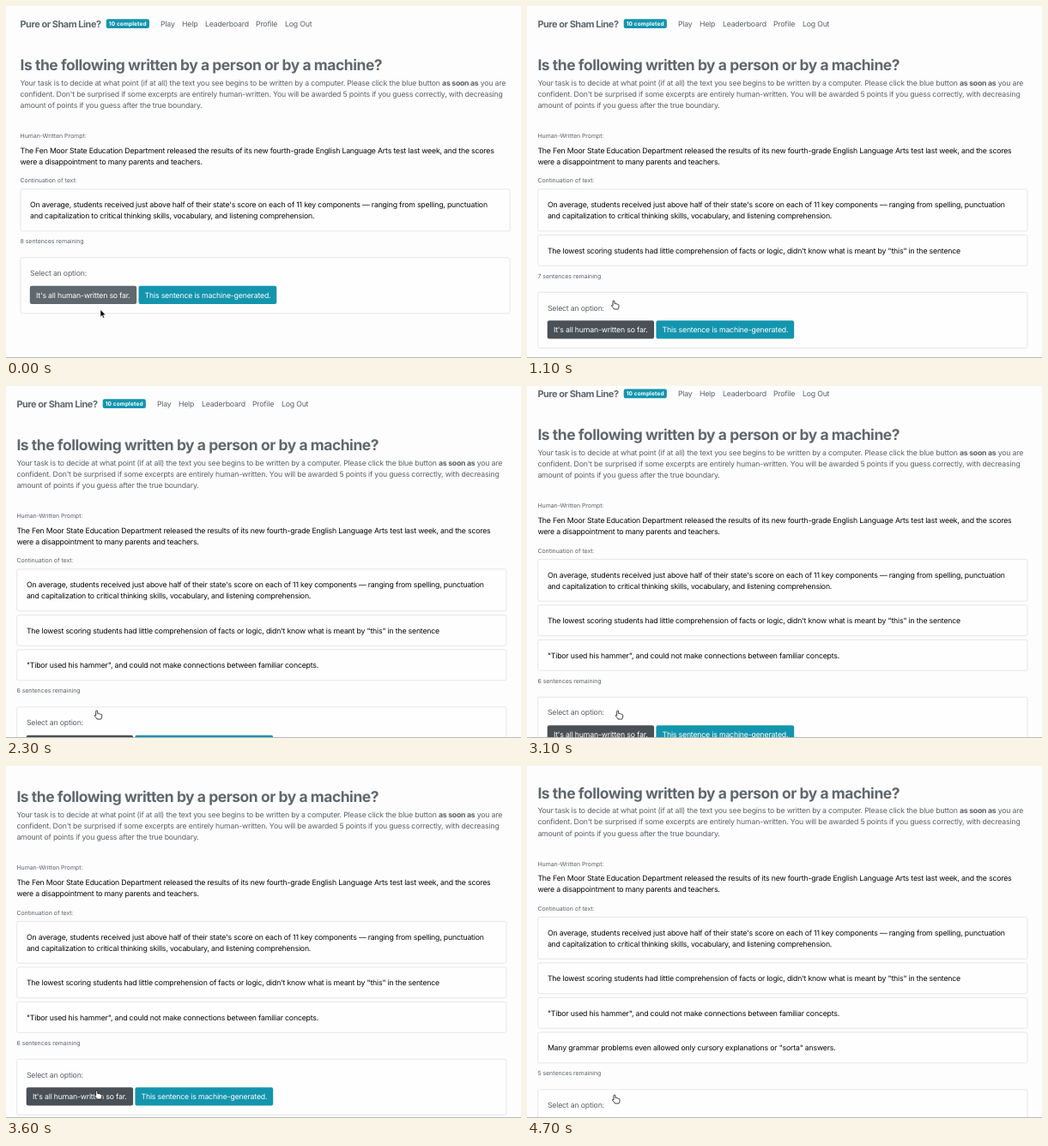
These frames come from a looping animation (600x411 px, 5000 ms). An HTML page:

```html
<!DOCTYPE html>
<html lang="en">
<head>
<meta charset="utf-8">
<title>Written by a person or by a machine?</title>
<style>
  html, body { margin: 0; height: 100%; overflow: hidden; background: #fdfdfd; }
  svg { display: block; width: 100vw; height: 100vh; }
  text { font: 8.72px Inter, "Open Sans", sans-serif; letter-spacing: -.0205em; fill: #080808; text-rendering: geometricPrecision; white-space: pre; }
  .grey { fill: #59616a; }
  .small { font-size: 6.98px; letter-spacing: -.004em; fill: #59616a; }
  .title { font-size: 17.45px; font-weight: 700; letter-spacing: -.026em; fill: #60676e; }
  .brand { font-size: 10.9px; font-weight: 700; letter-spacing: -.04em; fill: #60676e; }
  .badge { font-size: 6.54px; font-weight: 700; letter-spacing: .016em; fill: #fff; }
  .label { fill: #fff; }
  .bold { font-weight: 700; letter-spacing: -.03em; }
  .card { fill: #fefefe; stroke: #dcdddf; stroke-width: .7; }
  .teal { fill: #1495ae; }
</style>
</head>
<body>
<svg viewBox="0 0 600 411">
  <g id="page"></g>
  <rect y="410" width="600" height="1" fill="#b9b9b9"/>
  <path id="arrow" d="M0 0V8.6L2 6.8 3.3 9.8 4.7 9.2 3.4 6.3H6.1Z" fill="#000" stroke="#fff" stroke-width=".6"/>
  <path id="hand" d="M-1 1a1 1 0 0 1 2 0v2.4q1.6-.5 1.8.5 1.5-.4 1.7.5 1.5-.2 1.5 1V7q0 1.5-1 3h-4.6q-.5-1.2-2.5-3.3-.9-1.3.2-1.6.5 0 .9.8z" fill="#fff" stroke="#111" stroke-width=".8" stroke-linejoin="round"/>
</svg>
<script>
const LOOP = 5000, STEP = 100;
const ROW = 40.5;                       // height one more sentence adds
const ADD_TIMES = [1000, 2200, 4300];   // clicks that reveal a sentence
const CURSOR = [
  [0, 110, 354.5], [600, 101, 344], [1200, 101, 344], [1600, 105.7, 378.2],
  [1800, 105.7, 378.2], [1900, 105.7, 379], [4300, 105.7, 379], [4700, 102, 384]
];
const $ = id => document.getElementById(id);
const text = (x, y, str, cls = "") => `<text x="${x}" y="${y}" class="${cls}">${str}</text>`;
const rect = (x, y, w, h, attrs) => `<rect x="${x}" y="${y}" width="${w}" height="${h}" rx="2.2" ${attrs}/>`;
const card = (y, h) => rect(16.8, y, 570.3, h, 'class="card"');

const nav = [[180, "Play"], [205, "Help"], [232, "Leaderboard"], [291, "Profile"], [325, "Log Out"]];
const sentences = [
  "The lowest scoring students had little comprehension of facts or logic, didn't know what is meant by \"this\" in the sentence",
  "\"Tibor used his hammer\", and could not make connections between familiar concepts.",
  "Many grammar problems even allowed only cursory explanations or \"sorta\" answers."
];

$("page").innerHTML =
  text(16.5, 24.5, "Pure or Sham Line?", "brand") +
  rect(116.8, 15.2, 50.2, 10.7, 'class="teal"') + text(119.8, 22.9, "10 completed", "badge") +
  nav.map(([x, word]) => text(x, 23.8, word, "grey")).join("") +
  text(16.5, 75, "Is the following written by a person or by a machine?", "title") +
  text(16.5, 92.8, 'Your task is to decide at what point (if at all) the text you see begins to be written by a computer. Please click the blue button <tspan class="bold">as soon as</tspan> you are', "grey") +
  text(16.5, 105.9, "confident. Don't be surprised if some excerpts are entirely human-written. You will be awarded 5 points if you guess correctly, with decreasing", "grey") +
  text(16.5, 119, "amount of points if you guess after the true boundary.", "grey") +
  text(16.5, 154, "Human-Written Prompt:", "small") +
  text(16.5, 171.5, "The Fen Moor State Education Department released the results of its new fourth-grade English Language Arts test last week, and the scores") +
  text(16.5, 184.6, "were a disappointment to many parents and teachers.") +
  text(16.5, 206.3, "Continuation of text:", "small") +
  card(213.9, 48.9) +
  text(28, 235.2, "On average, students received just above half of their state's score on each of 11 key components — ranging from spelling, punctuation") +
  text(28, 248.3, "and capitalization to critical thinking skills, vocabulary, and listening comprehension.") +
  sentences.map((str, i) =>
    `<g class="extra">${card(267.4 + i * ROW, 35.9)}${text(28, 288.7 + i * ROW, str)}</g>`).join("") +
  `<g id="footer">${text(16.5, 277.2, "", "small")}${card(293.8, 65.1)}` +
  text(28, 315.1, "Select an option:", "grey") +
  rect(27.8, 326.8, 124.4, 21.2, 'id="button"') + text(35, 340.7, "It's all human-written so far.", "label") +
  rect(154.5, 326.8, 160.8, 21.2, 'class="teal"') + text(161.6, 340.7, "This sentence is machine-generated.", "label") +
  "</g>";

const extras = document.querySelectorAll(".extra");
const remaining = document.querySelector("#footer text");

function cursorAt(t) {
  const i = CURSOR.findIndex(key => key[0] > t);
  if (i < 0) return CURSOR.at(-1).slice(1);
  const [a, b] = [CURSOR[i - 1], CURSOR[i]];
  const u = (t - a[0]) / (b[0] - a[0]), ease = u * u * (3 - 2 * u);
  return [1, 2].map(k => a[k] + (b[k] - a[k]) * ease);
}

function scrollAt(t) {
  if (t < 3100) return 0;
  return 37.5 - 25.9 * Math.max(0, 1 - (t - 3100) / 750) ** 1.5;
}

function draw(t) {
  const added = ADD_TIMES.filter(time => t >= time).length;
  const [x, y] = cursorAt(t);
  const pointing = t >= 600 || y < 348;
  const hovered = t < 1300 ? pointing : y > 367;

  // The page shifts left once its scrollbar appears.
  $("page").setAttribute("transform", `translate(${added ? -4.1 : 0} ${-scrollAt(t)})`);
  extras.forEach((row, i) => row.style.display = i < added ? "" : "none");
  $("footer").setAttribute("transform", `translate(0 ${added * ROW})`);
  remaining.textContent = `${8 - added} sentences remaining`;
  $("button").setAttribute("fill", hovered ? "#495056" : "#60686f");

  for (const id of ["arrow", "hand"]) {
    $(id).setAttribute("transform", `translate(${x} ${y})`);
    $(id).style.display = (id === "hand") === pointing ? "" : "none";
  }
}

const start = performance.now();
function tick() {
  const t = (performance.now() - start) % LOOP;
  draw(Math.floor(t / STEP) * STEP);
  requestAnimationFrame(tick);
}
tick();
</script>
</body>
</html>
```
